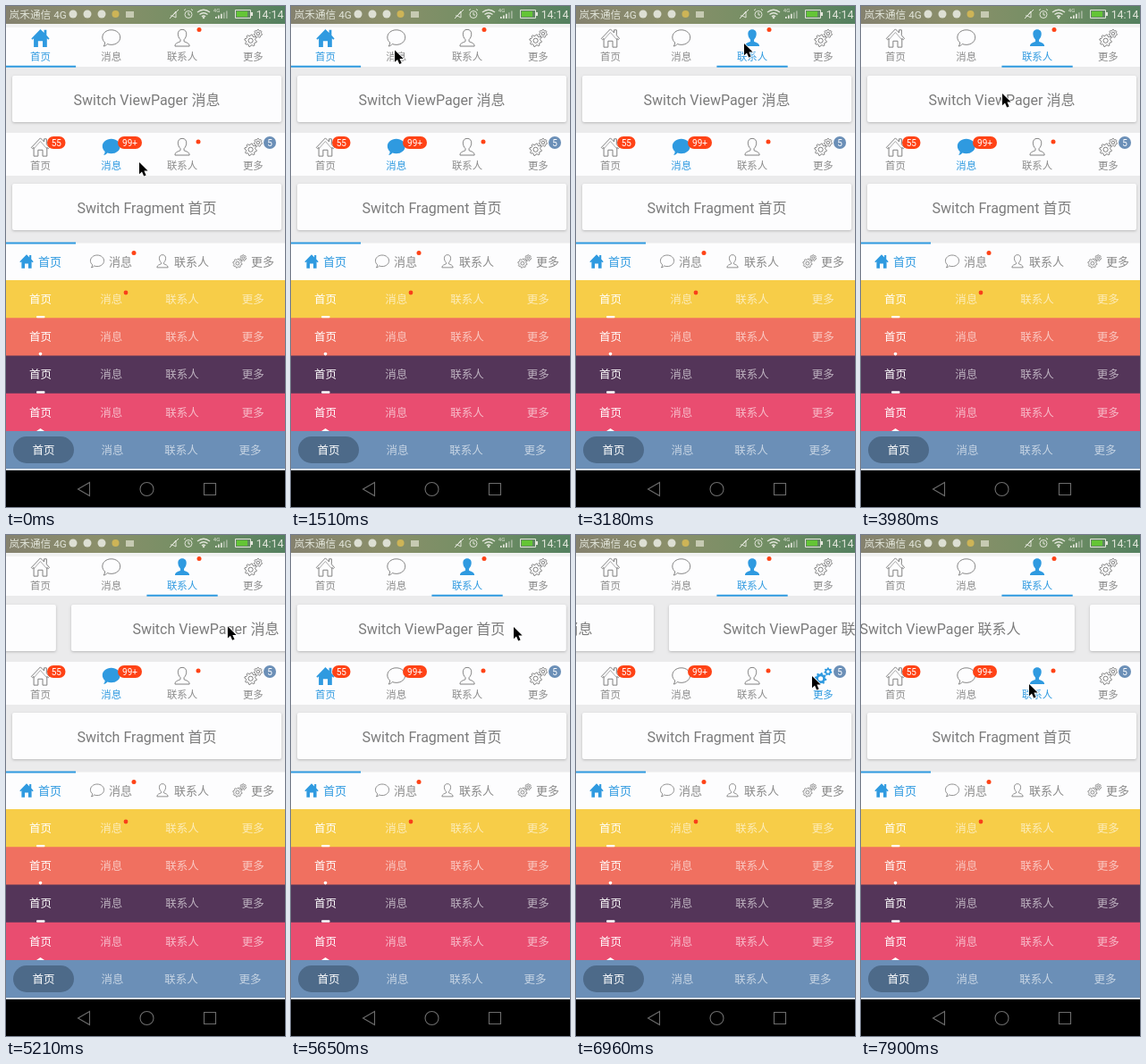
An HTML page with a canvas that plays this animation: 312 px wide and 561 px high, repeating every 7990 ms.

```html
<!DOCTYPE html>
<html lang="zh">
<head>
<meta charset="utf-8">
<title>Tab layouts</title>
<style>
html, body { margin: 0; width: 100%; height: 100%; overflow: hidden; background: #000; }
canvas { display: block; width: 312px; height: 561px; }
</style>
</head>
<body>
<canvas id="stage"></canvas>
<script>
const W = 312, H = 561, LOOP = 7990, STEP = 87.7, LAST = 90;
const BLUE = '#2f9ae0', GRAY = '#8b8b8b', RED = '#ff4316', SLATE = '#6b8fb7';
const FONT = 'Roboto, "Noto Sans CJK SC", "Noto Sans CJK", sans-serif';
const TABS = ['首页', '消息', '联系人', '更多'];
const TAB_LEFT = -1.2, TAB_W = 79.3, PITCH = 318, SLOP = 6;

const canvas = document.getElementById('stage');
const ctx = canvas.getContext('2d');
const dpr = window.devicePixelRatio || 1;
canvas.width = W * dpr;
canvas.height = H * dpr;

const LINE_MOVE = { at: 31.6, span: 2.8, tab: 2 };

// Pointer moves: start, span, x, y
const moves = [
  [0, 2, 97, 62], [3, 3, 114, 50], [16, 3, 122, 48], [21, 4, 174, 46],
  [26, 2, 183, 40], [28, 2, 188, 42], [42, 3, 158, 98], [45, 5, 90, 156],
  [50, 2, 120, 132], [53, 2, 176, 103], [56, 5, 287, 102], [61, 6, 211, 104],
  [67.4, 4, 96, 106], [71.4, 3.6, 264, 158], [79, 7, 188, 167]
];
// Page turns; those with a drag follow the pointer until release.
const turns = [
  { drag: 56, at: 61, span: 4, page: 0 },
  { drag: 67.4, at: 71, span: 4, page: 1 },
  { at: 78.72, span: 3.42, page: 3 },
  { at: 89.4, span: 2.28, page: 2 }
];

const clamp = u => Math.max(0, Math.min(1, u));
const smooth = u => u * u * (3 - 2 * u);
const settle = u => 1 - (1 - u) ** 5;
const tabX = i => TAB_LEFT + TAB_W * (i + 0.5);

function pointerAt(s) {
  let x = 149, y = 175;
  for (const [at, span, toX, toY] of moves) {
    const u = smooth(clamp((s - at) / span));
    x += (toX - x) * u;
    y += (toY - y) * u;
  }
  return [x, y];
}
function scrollAt(s) {
  let pos = PITCH;
  for (const { drag, at, span, page } of turns) {
    if (s > drag) {
      const dx = pointerAt(Math.min(s, at))[0] - pointerAt(drag)[0];
      pos -= Math.sign(dx) * Math.max(0, Math.abs(dx) - SLOP);
    }
    pos += (page * PITCH - pos) * settle(clamp((s - at) / span));
  }
  return pos;
}
const pageAt = s => turns.reduce((page, t) => s >= t.at ? t.page : page, 1);

function rect(x, y, w, h, color, r = 0) {
  ctx.fillStyle = color;
  ctx.beginPath();
  ctx.roundRect(x, y, w, h, r);
  ctx.fill();
}
function dot(x, y, r, color) {
  ctx.fillStyle = color;
  ctx.beginPath();
  ctx.arc(x, y, r, 0, 7);
  ctx.fill();
}
function text(str, x, y, size, color, align = 'center') {
  ctx.font = size + 'px ' + FONT;
  ctx.textAlign = align;
  ctx.fillStyle = color;
  ctx.fillText(str, x, y + size * 0.37);
}
function stroke(d, color, width = 1) {
  ctx.strokeStyle = color;
  ctx.lineWidth = width;
  ctx.stroke(new Path2D(d));
}
function fade(x, y, ...colors) {
  const g = ctx.createLinearGradient(0, 0, x, y);
  colors.forEach((c, i) => g.addColorStop(i / (colors.length - 1), c));
  return g;
}

function gear(x, y, r, teeth) {
  const p = new Path2D(), n = teeth * 4;
  for (let i = 0; i < n; i++) {
    const a = (i + 0.5) / n * Math.PI * 2, q = i % 4 < 2 ? r : r * 0.76;
    p.lineTo(x + q * Math.cos(a), y + q * Math.sin(a));
  }
  p.closePath();
  p.moveTo(x + r * 0.38, y);
  p.arc(x, y, r * 0.38, 0, Math.PI * 2);
  return p;
}
const gears = gear(-3, 3, 7.4, 8);
gears.addPath(gear(6, -5.5, 5, 7));
const ICONS = [
  new Path2D('M-11 .5L0-11L4.5-6.5V-10H7.5V-3.5L11 .5L9.6 1.8L8 .4V11H2.8V3.5H-2.8V11H-8V.4L-9.6 1.8Z'),
  new Path2D('M0-10C6.2-10 10.8-6 10.8-1S6.2 8 0 8C-1.8 8-3.4 7.7-4.8 7.1C-6 8.6-7.4 9.6-9.4 9.8C-8.2 8.4-7.8 7-7.7 5.4C-9.6 3.8-10.8 1.6-10.8-1C-10.8-6-6.2-10 0-10Z'),
  new Path2D('M0-10.5C3.5-10.5 5.3-8 5.1-4.8C5-2 3.8 .2 2.2 1.8V4C4.6 5.5 8.6 5.4 8.8 9.8H-8.8C-8.6 5.4-4.6 5.5-2.2 4V1.8C-3.8 .2-5-2-5.1-4.8C-5.3-8-3.5-10.5 0-10.5Z'),
  gears
];
function icon(i, x, y, scale, on) {
  ctx.save();
  ctx.translate(x, y);
  ctx.scale(scale, scale);
  ctx.lineJoin = 'round';
  if (on) {
    ctx.fillStyle = BLUE;
    ctx.fill(ICONS[i], 'evenodd');
  } else {
    ctx.strokeStyle = '#7c7c7c';
    ctx.lineWidth = 1 / Math.sqrt(scale);
    ctx.stroke(ICONS[i]);
    if (i === 0) stroke('M-8 2L0-7L8 2', '#7c7c7c', 0.7);
  }
  ctx.restore();
}

function statusBar() {
  rect(0, 0, W, 20, fade(W, 0, '#85826f', '#8b8f6a', '#738f64', '#54805f'));
  const ink = '#e2e5da';
  text('岚禾通信 4G', 3.5, 9.5, 11.7, ink, 'left');
  for (let x = 75; x < 110; x += 16) dot(x, 9, 4.5, '#dddfd3');
  dot(122.5, 9, 4, '#cdb457');
  rect(134, 6, 9, 7, '#c6cab2');

  stroke('M184 11H186L190 6V13L186 11M183 14L193 4', ink);
  stroke('M208 9.5A4 4 0 1 1 200 9.5A4 4 0 1 1 208 9.5M204 7V10H206M199 5L201 3.5M209 5L207 3.5', ink);
  stroke('M214 7Q221 1.5 228 7M216.5 9.5Q221 6 225.5 9.5M219 12Q221 10 223 12', ink, 1.4);
  dot(221, 13.2, 1.1, ink);
  text('4G', 235.5, 4.5, 6, ink);
  for (let i = 0; i < 5; i++)
    rect(234 + i * 3, 12 - i * 1.6, 1.7, 2 + i * 1.6, i < 3 ? ink : '#a2b39c');
  stroke('M256.5 4.5H273.5V13.5H256.5Z', ink);
  rect(258, 6, 12, 6, '#64c536');
  rect(274, 7, 2, 4, ink);
  text('14:14', 310.5, 9.3, 12.4, ink, 'right');
}

function iconTabs(top, selected) {
  rect(0, top, W, 48, '#fdfdfe');
  TABS.forEach((name, i) => {
    const on = i === selected;
    icon(i, tabX(i), top + 16, 0.92, on);
    text(name, tabX(i), top + 36.5, 11.4, on ? BLUE : GRAY);
  });
}
function card(x, y, label) {
  ctx.save();
  ctx.shadowColor = 'rgba(0,0,0,.22)';
  ctx.shadowBlur = 3 * dpr;
  ctx.shadowOffsetY = dpr;
  rect(x, y, 301, 52, '#fdfdfe', 2);
  ctx.restore();
  text(label, x + 150.5, y + 27, 16, '#7b7b7b');
}
function badge(label, x, y, w, color) {
  rect(x, y, w, 14, color, 7);
  text(label, x + w / 2, y + 7.2, 10, '#fff');
}

function inlineTabs() {
  rect(0, 265.5, W, 42, '#fdfdfe');
  rect(0, 264.5, 78, 2, BLUE);
  [23, 102, 175, 261].forEach((x, i) => {
    icon(i, x, 286, 0.7, i === 0);
    text(TABS[i], x + 13, 286, 13, i ? GRAY : BLUE, 'left');
  });
  dot(143, 276.5, 2.5, RED);
}
function colorTabs() {
  ['#f7cd48', '#f07060', '#543559', '#e94d70', SLATE].forEach((color, row) => {
    const top = 307 + row * 42.25, block = row === 4;
    rect(0, top, W, 43, color);
    if (block) rect(8, 482, 68, 30, '#4d6a89', 15);
    TABS.forEach((name, i) => {
      const x = block ? 42 + i * 77 : tabX(i);
      text(name, x, top + 21.2, 12.5, i ? 'rgba(255,255,255,.62)' : '#fff');
    });
  });
  rect(34, 347, 9.5, 2.2, '#fff', 1);
  dot(38.5, 389.6, 1.8, '#fff');
  rect(34, 431.3, 9.5, 2.4, '#fff', 1);
  ctx.fillStyle = '#fff';
  ctx.fill(new Path2D('M34 476L38.5 473L43 476Z'));
  dot(134, 321, 2.4, '#f8401b');
}
function navBar() {
  rect(0, 518, W, 2, '#d5dbe2');
  rect(0, 520, W, 41, '#000');
  const ink = '#6c6c6c';
  stroke('M93.5 533.5V548.5L80.5 541Z', ink, 1.1);
  stroke('M165 541A7.5 7.5 0 1 1 150 541A7.5 7.5 0 1 1 165 541Z', ink, 1.1);
  stroke('M221.5 534.5H234.5V547.5H221.5Z', ink, 1.1);
}
function pointer(x, y) {
  const arrow = new Path2D('M0 0V13.2L3 10.4L5.2 15.4L7.6 14.4L5.4 9.6H9.6Z');
  ctx.save();
  ctx.translate(x, y);
  ctx.lineJoin = 'round';
  ctx.strokeStyle = '#fff';
  ctx.lineWidth = 1.6;
  ctx.stroke(arrow);
  ctx.fillStyle = '#000';
  ctx.fill(arrow);
  ctx.restore();
}

function draw(s) {
  ctx.setTransform(dpr, 0, 0, dpr, 0, 0);
  rect(0, 0, W, H, '#ebebec');
  statusBar();

  const { at, span, tab } = LINE_MOVE;
  iconTabs(20, s >= at ? tab : 0);
  rect(0, 20, W, 4, '#f1f2f1');
  rect(TAB_LEFT + smooth(clamp((s - at) / span)) * tab * TAB_W, 66.7, TAB_W, 2, BLUE);
  dot(216, 26.5, 2.5, RED);

  const scroll = scrollAt(s);
  TABS.forEach((name, i) => card(7 + i * PITCH - scroll, 78, 'Switch ViewPager ' + name));

  iconTabs(142, pageAt(s));
  badge('55', 46, 146, 20.5, RED);
  badge('99+', 125, 146, 27, RED);
  dot(215, 152, 2.5, RED);
  badge('5', 288, 146, 14, SLATE);

  card(7, 199, 'Switch Fragment 首页');
  inlineTabs();
  colorTabs();
  navBar();
  pointer(...pointerAt(s));
}

const start = performance.now();
function tick() {
  const t = (performance.now() - start) % LOOP;
  draw(Math.min(LAST, Math.floor(t / STEP)));
  requestAnimationFrame(tick);
}
tick();
</script>
</body>
</html>
```
